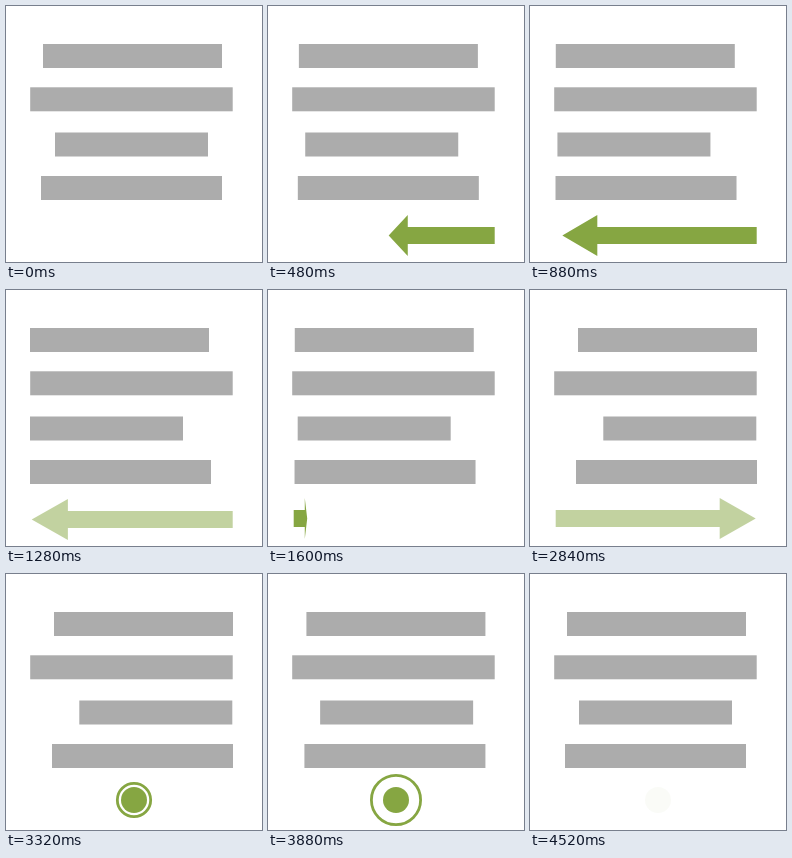
An HTML page with a canvas for the animation above (4.56 s loop, 256 px wide and 256 px high).

```html
<!DOCTYPE html>
<html lang="en">
<head>
<meta charset="utf-8">
<title>Text alignment</title>
<style>
  html, body { margin: 0; height: 100%; overflow: hidden; background: #fff; }
  canvas { display: block; width: 100vw; height: 100vh; }
</style>
</head>
<body>
<canvas width="256" height="256"></canvas>
<script>
const ctx = document.querySelector('canvas').getContext('2d');
const LOOP = 4560, STEP = 40, GREEN = '#86a642';

// Left edge when centred, left- and right-aligned
const bars = [
  { y: 38, width: 179, center: 37, left: 24, right: 48 },
  { y: 81.3, width: 202.5, center: 24.2, left: 24.2, right: 24.2 },
  { y: 126.5, width: 153, center: 49, left: 24, right: 73.3 },
  { y: 170, width: 181, center: 35, left: 24, right: 46 }
];

const ramp = (t, from, to) => Math.min(1, Math.max(0, (t - from) / (to - from)));
const mix = (a, b, p) => a + (b - a) * p;

function barX(bar, t) {
  if (t < 1480) return mix(bar.center, bar.left, ramp(t, 0, 1020));
  if (t < 3340) return mix(bar.left, bar.right, ramp(t, 1480, 2520));
  return mix(bar.right, bar.center, ramp(t, 3340, 3960));
}

function arrow(tail, y, length, alpha) {
  if (!length || !alpha) return;
  const neck = tail + length * 0.82;
  ctx.globalAlpha = alpha;
  ctx.beginPath();
  ctx.moveTo(tail, y - 8.5);
  ctx.lineTo(neck, y - 8.5);
  ctx.lineTo(neck, y - 20.5);
  ctx.lineTo(tail + length, y);
  ctx.lineTo(neck, y + 20.5);
  ctx.lineTo(neck, y + 8.5);
  ctx.lineTo(tail, y + 8.5);
  ctx.fill();
}

function circle(radius) {
  ctx.beginPath();
  ctx.arc(128, 226, radius, 0, Math.PI * 2);
}

function target(t) {
  if (t < 3160) return;
  ctx.globalAlpha = ramp(t, 3120, 3240) * (1 - ramp(t, 4200, 4535));
  circle(13);
  ctx.fill();
  ctx.globalAlpha = 1 - ramp(t, 4200, 4500);
  circle(mix(11.6, 24.6, ramp(t, 3160, 3570)));
  ctx.stroke();
}

function draw(now) {
  const t = Math.floor(now % LOOP / STEP) * STEP;
  ctx.globalAlpha = 1;
  ctx.fillStyle = '#fff';
  ctx.fillRect(0, 0, 256, 256);
  ctx.fillStyle = '#acacac';
  for (const bar of bars) ctx.fillRect(barX(bar, t), bar.y, bar.width, 24);

  ctx.fillStyle = ctx.strokeStyle = GREEN;
  ctx.lineWidth = 2.8;
  arrow(226.7, 229.6, -201 * ramp(t, 0, 910), 1 - ramp(t, 1160, 1400));
  arrow(25.7, 228.5, 200 * ramp(t, 1536, 2483), 1 - ramp(t, 2720, 2960));
  target(t);
}

let start;
function frame(now) {
  start ??= now;
  draw(now - start);
  requestAnimationFrame(frame);
}
requestAnimationFrame(frame);
</script>
</body>
</html>
```
